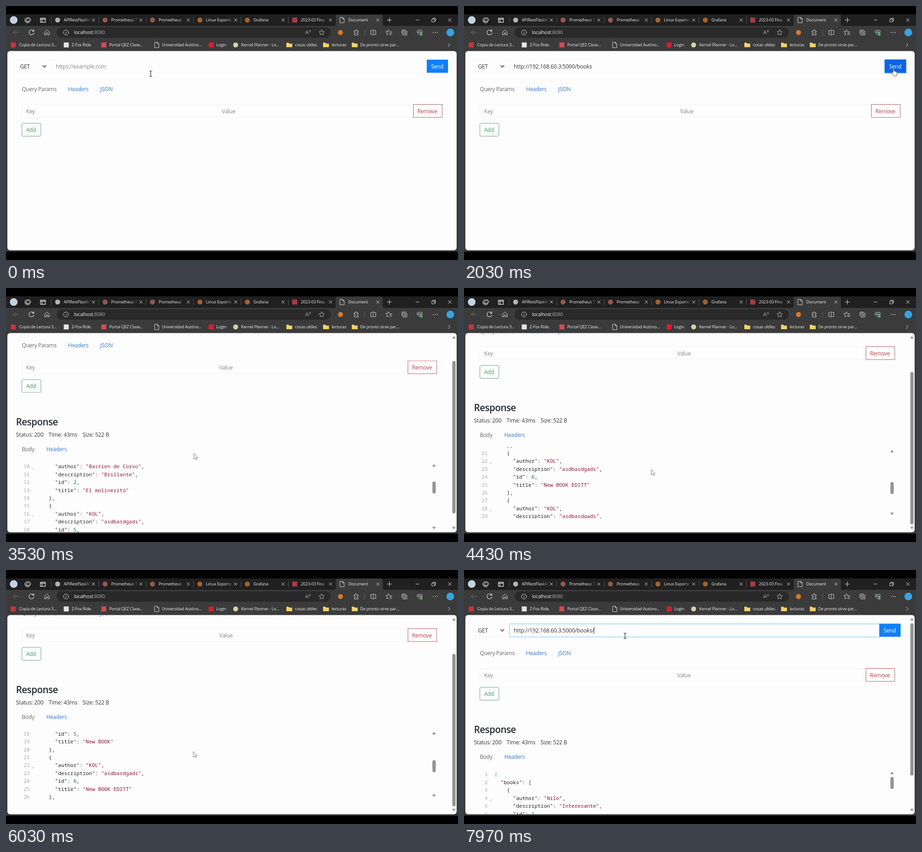
An HTML page for the animation above (8000 ms loop, 998 px wide and 561 px high).

```html
<!DOCTYPE html>
<html lang="es">
<head>
<meta charset="utf-8">
<title>Document</title>
<style>
  html, body { margin: 0; width: 100%; height: 100%; overflow: hidden; background: #000; }
  svg { display: block; width: 998px; height: 561px; }
  text { font-family: "Open Sans", "Noto Sans", sans-serif; letter-spacing: -.025em; white-space: pre; }
  .small { font-size: 9.25px; fill: #eee; }
  .body { font-size: 12.12px; fill: #333; }
  .loose { letter-spacing: -.012em; }
  .code text { font: 11.33px "Noto Sans Mono", "DejaVu Sans Mono", monospace; letter-spacing: 0; fill: #222; }
  .code .number { fill: #a9a9a9; }
  .code .string { fill: #8f1030; }
  .code .digit { fill: #1b6b50; }
  .code .match { fill: #22d83a; }
  .line { fill: none; stroke: #ddd; stroke-width: 1; stroke-linecap: round; stroke-linejoin: round; }
  .field { fill: none; stroke: #f5f5f7; }
  .muted { fill: #868686; }
  .tab { fill: #666; }
  .link { fill: #3978d4; }
  .bar { fill: #949494; }
</style>
</head>
<body>
<svg viewBox="0 0 998 561">
  <defs>
    <clipPath id="view"><rect x="3" y="99.500" width="992" height="440" rx="6"/></clipPath>
    <clipPath id="pane"><rect x="22" y="439.500" width="915" height="157"/></clipPath>
    <linearGradient id="fade">
      <stop stop-color="#202020" stop-opacity="0"/><stop offset=".75" stop-color="#202020"/>
    </linearGradient>
  </defs>

  <rect width="998" height="561"/>
  <rect y="18.500" width="998" height="26" fill="#202020"/>
  <rect y="44" width="998" height="498.500" fill="#3b3b3b"/>
  <path d="M724 44q4 0 4-4V23q0-4 4-4h96q4 0 4 4v17q0 4 4 4z" fill="#3b3b3b"/>
  <circle cx="17" cy="31" r="8.500" fill="#c3d2e0"/>
  <g id="tabs"></g>

  <g class="line">
    <path d="M45 26h7l3 4-3 5h-7l-3-5zM42 29v5l3 3h6M46 28h5l2 3-2 3h-5z"/>
    <path d="M76 27h11v9h-11zM76 29.500h11M79.500 29.500v6.500" stroke-width="1.300"/>
    <path d="M841.500 31h10M846.500 26v10M905 31h7M940.500 29h6v6h-6zM942.500 29v-2h6v6h-2M976.500 27.500l7 7m0-7l-7 7"/>
    <path d="M28 58H16m5-5l-5 5 5 5" stroke="#777"/>
    <path d="M61 55.500a5.500 5.500 0 1 0 .6 4M61.500 52v3.700h-3.700" stroke-width="1.200"/>
    <path d="M85.500 57.500l5-4.500 5 4.500v6h-3.500v-4h-3v4h-3.500z"/>
  </g>

  <rect x="112" y="47" width="605" height="23" rx="11.500" fill="#292929"/>
  <g class="line">
    <circle cx="132.500" cy="58.500" r="5.500"/><path d="M132.500 58v3M132.500 55.700v.1"/>
    <path d="M661 62l3.500-8 3.500 8m-5.800-2.700h4.600M669.500 54q1.500 1.500 0 3M671.500 53q2 2.500 0 5" stroke="#aaa"/>
    <path d="M697 52.500l1.800 3.700 4 .6-2.900 2.900.7 4-3.600-1.900-3.600 1.900.7-4-2.900-2.900 4-.6z" stroke="#bbb"/>
    <path d="M769 55h2.500q-.5-2.500 1.500-2.500t1.500 2.500h3v3q-2.500-.5-2.500 1.500t2.500 1.500v3h-8.500v-3q2.500.5 2.500-1.500t-2.500-1.500z"/>
    <path d="M792 52v13" stroke="#666"/>
    <path d="M809 54h-3.500v9h3.500M813 54h3.500v9h-3.500M811 52v13"/>
    <path d="M844 62l-3 1.500.6-4-2.800-2.800 3.900-.6 1.800-3.600 1.800 3.600M847 57h5M847 60h5M847 63h4"/>
    <path d="M874 61v-6q0-2 2-2h6M877 55.500h8v8.500h-8zM881 57.500v4.500M879 59.800h4"/>
    <path d="M913.500 64l-5-5q-2-4 1.500-5.500 2-.5 3.500 1.500 1.500-2 3.500-1.500 3.500 1.500 1.500 5.500M909 58h3l1.500-2 1.500 4 1-2h2"/>
    <path d="M943.500 58.500h.1m4.300 0h.1m4.300 0h.1" stroke-width="1.800"/>
    <path d="M976.500 82l4 4-4 4"/>
  </g>
  <circle cx="917" cy="62.500" r="3" fill="#4caf62"/>
  <circle cx="738.500" cy="58.500" r="5.500" fill="#d9772b"/>
  <circle cx="981" cy="58.500" r="8.500" fill="#35a4e4"/>
  <text x="150" y="62" font-size="10.700" fill="#f2f2f2">localhost<tspan fill="#a8a8a8">:8080</tspan></text>
  <g id="bookmarks"></g>

  <g clip-path="url(#view)">
    <rect x="3" y="99" width="992" height="441" fill="#fdfdfd"/>
    <g id="page">
      <rect class="field" x="22.500" y="119" width="78" height="29"/>
      <rect class="field wide" x="100.500" y="119" width="829" height="29"/>
      <text class="body" x="31" y="138">GET</text>
      <path class="line" d="M81 131.500l3.700 3.700 3.700-3.700" style="stroke:#333;stroke-width:1.400"/>
      <text class="body muted" id="placeholder" x="110" y="138">https://example.com</text>
      <g id="focus" fill="none">
        <rect class="wide" x="100.500" y="119" width="829" height="29" stroke="#d7f1fb" stroke-width="3"/>
        <rect class="wide" x="100.500" y="119" width="829" height="29" stroke="#9fdcf2"/>
      </g>
      <text class="body loose" id="url" x="110" y="138">http://192.168.60.3:5000/books<tspan id="slash">/</tspan></text>
      <path id="caret" d="M110.500 126v15" stroke="#222"/>
      <g class="right">
        <rect id="ring" x="927.500" y="117.500" width="50" height="32" rx="2" fill="#a5d5fc"/>
        <rect x="929" y="118.500" width="47" height="29" fill="#117ffa"/>
        <rect id="hover" x="929" y="118.500" width="47" height="29" fill="#0d63e5"/>
        <text class="body" x="938.500" y="138" style="fill:#fff">Send</text>
      </g>
      <text class="body tab" x="35" y="187.500">Query Params</text>
      <text class="body link" x="137" y="187.500">Headers</text>
      <text class="body link loose" x="208" y="187.500">JSON</text>
      <rect class="field wide" x="35.500" y="217.500" width="864" height="28.500"/>
      <text class="body muted" x="44.500" y="237">Key</text>
      <text class="body muted" id="value" x="477" y="237">Value</text>
      <g class="right">
        <rect x="899.500" y="217.500" width="63.500" height="28.500" fill="#fdfdfd" stroke="#b5586a"/>
        <text class="body" x="908.500" y="237" style="fill:#b93f55">Remove</text>
      </g>
      <rect x="35" y="259" width="42" height="28.500" rx="2.500" fill="none" stroke="#679f88"/>
      <text class="body" x="44.500" y="278" style="fill:#3f9c60">Add</text>

      <g class="response">
        <text x="22" y="360" font-size="20.900" font-weight="600" fill="#262b30">Response</text>
        <text class="body loose" x="22" y="385">Status: 200</text>
        <text class="body loose" x="94" y="385">Time: 43ms</text>
        <text class="body loose" x="169" y="385">Size: 522 B</text>
        <text class="body tab" x="35" y="416.500">Body</text>
        <text class="body link" x="89" y="416.500">Headers</text>
        <g clip-path="url(#pane)"><g id="code" class="code"></g></g>
        <path class="bar" d="M941 451l4-5.500 4 5.500zM941 584l4 5.500 4-5.500z"/>
        <rect class="bar" id="codeThumb" x="941.500" y="457" width="7.300" height="26.500" rx="3.600"/>
      </g>
    </g>
    <g class="response">
      <path class="bar" d="M985 111.500l4-5.500 4 5.500zM985 527.500l4 5.500 4-5.500z"/>
      <rect class="bar" id="pageThumb" x="985.400" y="117.500" width="7.300" height="336.500" rx="3.600"/>
    </g>
  </g>

  <g id="pointer">
    <path id="arrow" d="M0 0V12l2.800-2.500 1.800 4.100 2-.9-1.800-3.900h3.700z" fill="#fff" stroke="#555" stroke-width=".8"/>
    <path id="beam" d="M-3-6h2q1 0 1 1V5q0 1-1 1h-2M3-6H1q-1 0-1 1V5q0 1 1 1h2" fill="none" stroke="#111" stroke-width="1.100"/>
    <path id="hand" d="M-1.300 1q0-1.300 1.200-1.300T1.100 1v4.500q1.800-.8 2.300.5 1.700-.6 2.200.7 2-.4 2 1.600v3.700q0 4-3.800 4H1.500q-1.500 0-2.500-1.500l-3-5.300q-.6-1.600.8-1.700 1 0 1.900 1.500z" fill="#fff" stroke="#222" stroke-width=".9"/>
  </g>
</svg>

<script>
const LOOP = 8000, REPLY = 2150, NOTCH = 150;
const $ = id => document.getElementById(id);
const all = selector => document.querySelectorAll(selector);

function add(parent, tag, attrs, text) {
  const node = document.createElementNS('http://www.w3.org/2000/svg', tag);
  for (const key in attrs) node.setAttribute(key, attrs[key]);
  if (text) node.textContent = text;
  return parent.appendChild(node);
}

function icon(parent, kind, x, y, color) {
  if (kind === 'dot') add(parent, 'circle', { cx: x, cy: y, r: 5.5, fill: color });
  if (kind === 'box') add(parent, 'rect', { x: x - 5.5, y: y - 5.5, width: 11, height: 11, fill: color });
  if (kind === 'doc') add(parent, 'path', { class: 'line', d: `M${x - 4.5} ${y - 6}h5.500l3.500 3.500v8.500h-9zM${x + 1} ${y - 6}v3.500h3.500` });
  if (kind === 'folder') add(parent, 'path', { d: `M${x - 6.5} ${y - 5}h5l1.500 2h6.500v8h-13z`, fill: '#f6d263' });
}

[
  ['dot', '#b4b4b4', 'APIRestFlaskM'],
  ['dot', '#96574f', 'Prometheus T'],
  ['dot', '#96574f', 'Prometheus'],
  ['dot', '#a3622f', 'Linux Exporte'],
  ['dot', '#a3622f', 'Grafana'],
  ['box', '#a93a47', '2023-03 Fina'],
  ['doc', '', 'Document'],
].forEach(([kind, color, title], i) => {
  const x = 104.7 * i, active = i === 6, tabs = $('tabs');
  if (!active) add(tabs, 'path', { d: `M${100 + x} 24v14`, stroke: '#555' });
  icon(tabs, kind, 114 + x, 31, color);
  add(tabs, 'text', { class: 'small', x: 127.5 + x, y: 34.3 }, title);
  if (!active) add(tabs, 'rect', { x: 170 + x, y: 24, width: 25, height: 15, fill: 'url(#fade)' });
  add(tabs, 'path', { class: 'line', d: `M${190 + x} 28l6 6m0-6l-6 6` });
});

[
  ['box', '#c8343f', 16, 29, 'Copia de Lectura 3...'],
  ['box', '#e4e4e4', 133, 145, 'Z-Fox Ride.'],
  ['box', '#d24a55', 216, 228, 'Portal QEZ Clase...'],
  ['doc', '', 333, 344, 'Universidad Autóno...'],
  ['box', '#d8202c', 453, 464, 'Login'],
  ['dot', '#d6cfae', 507, 519, 'Kernel Planner - Lo...'],
  ['folder', '', 625.5, 638, 'cosas ultiles'],
  ['folder', '', 706.5, 719, 'lecturas'],
  ['folder', '', 770, 782, 'De pronto sirve par...'],
].forEach(([kind, color, iconX, x, title]) => {
  icon($('bookmarks'), kind, iconX, 86, color);
  add($('bookmarks'), 'text', { class: 'small', x, y: 89 }, title);
});

const books = [
  ['Nilo', 'Interesante', 1, 'La ventolina'],
  ['Bastien de Corvo', 'Brillante', 2, 'El molinerito'],
  ['KOL', 'asdbasdgads', 5, 'New BOOK'],
  ['KOL', 'asdbasdgads', 6, 'New BOOK EDITT'],
  ['KOL', 'asdbasdgads', 7, 'New BOOK'],
  ['KOL', 'asdbasdgads', 8, 'New BOOK'],
].map(([author, description, id, title]) => ({ author, description, id, title }));

JSON.stringify({ books }, null, 2).split('\n').forEach((line, i, lines) => {
  const y = 455.3 + 17.44 * i, n = i + 1;
  const [, indent, key = '', value, comma] = line.match(/^(\s*)("\w+": )?(.*?)(,?)$/);
  const kind = i === 0 || n === lines.length ? 'match' : value[0] === '"' ? 'string' : /\d/.test(value) ? 'digit' : '';
  add($('code'), 'text', { class: 'number', x: 52.3, y, 'text-anchor': 'end' }, n);
  if (n % 6 === 4 || n === 8) add($('code'), 'path', { d: `M57 ${y - 0.5}l2 3 2-3`, fill: 'none', stroke: '#aaa', 'stroke-width': .8 });
  const text = add($('code'), 'text', { x: 67.3 + 6.8 * indent.length, y }, key);
  add(text, 'tspan', { class: kind }, value);
  add(text, 'tspan', {}, comma);
});

// steps: [ms, css properties]
function play(node, steps, easing = 'step-end') {
  const frames = steps.map(([t, css]) => ({ offset: t / LOOP, easing, ...css }));
  frames.push({ ...steps[steps.length - 1][1], offset: 1 });
  node.animate(frames, { duration: LOOP, iterations: Infinity });
}

// Visible during each [from, to) range
function show(node, ...ranges) {
  const steps = ranges.flatMap(([from, to]) => [[from, { opacity: 1 }], [to, { opacity: 0 }]]);
  if (steps[0][0] > 0) steps.unshift([0, { opacity: 0 }]);
  play(node, steps.filter(([t]) => t < LOOP));
}

const move = (x, y) => ({ transform: `translate(${x}px, ${y}px)` });
const shift = (node, dx) => play(node, [[0, move(0, 0)], [REPLY, move(dx, 0)]]);

// notches: [start ms, scroll position reached]
function wheel(node, notches, ratio) {
  let at = 0;
  const steps = [[0, move(0, 0)]];
  for (const [t, to] of notches) {
    steps.push([t, move(0, at * ratio)], [t + NOTCH, move(0, to * ratio)]);
    at = to;
  }
  play(node, steps, 'linear');
}

const pageWheel = [[3422, 78], [3640, 88], [6950, 10], [7100, 0]];
const codeWheel = [
  [2850, 78], [3050, 157.5], [4060, 235], [4214, 313], [4365, 391], [4600, 470], [4800, 543],
  [5560, 465], [5710, 387], [5860, 309], [6010, 231], [6160, 153], [6310, 75], [6460, 0],
];
wheel($('page'), pageWheel, -1);
wheel($('pageThumb'), pageWheel, .77);
wheel($('code'), codeWheel, -1);
wheel($('codeThumb'), codeWheel, 93 / 543);

all('.response').forEach(node => show(node, [REPLY, LOOP]));
all('.right').forEach(node => shift(node, -12));
shift($('value'), -6);
all('.wide').forEach(node => {
  const width = +node.getAttribute('width');
  play(node, [[0, { width: width + 'px' }], [REPLY, { width: width - 12 + 'px' }]]);
});

show($('placeholder'), [0, 1000]);
show($('url'), [1000, LOOP]);
play($('slash'), [[0, { fillOpacity: 0 }], [7850, { fillOpacity: 1 }]]);
show($('focus'), [350, 1980], [7560, LOOP]);
show($('caret'), [350, 1980], [7560, LOOP]);
play($('caret'), [[0, move(0, 0)], [1000, move(172, 0)], [7850, move(176.5, 0)]]);
show($('hover'), [1730, 2210]);
show($('ring'), [1980, 7560]);

show($('beam'), [0, 1730], [7440, LOOP]);
show($('hand'), [1730, 2210]);
show($('arrow'), [2210, 7440]);
play($('pointer'), [
  [0, 319.5, 149.5], [1150, 319.5, 149.5], [1780, 948.5, 138.5], [2150, 948.5, 138.5],
  [2700, 430, 480], [3200, 430, 480], [3400, 415, 366], [3700, 415, 366],
  [3880, 413.5, 401], [7150, 413.5, 401], [7500, 355.5, 145.5],
].map(([t, x, y]) => [t, move(x, y)]), 'ease-in-out');
</script>
</body>
</html>
```
